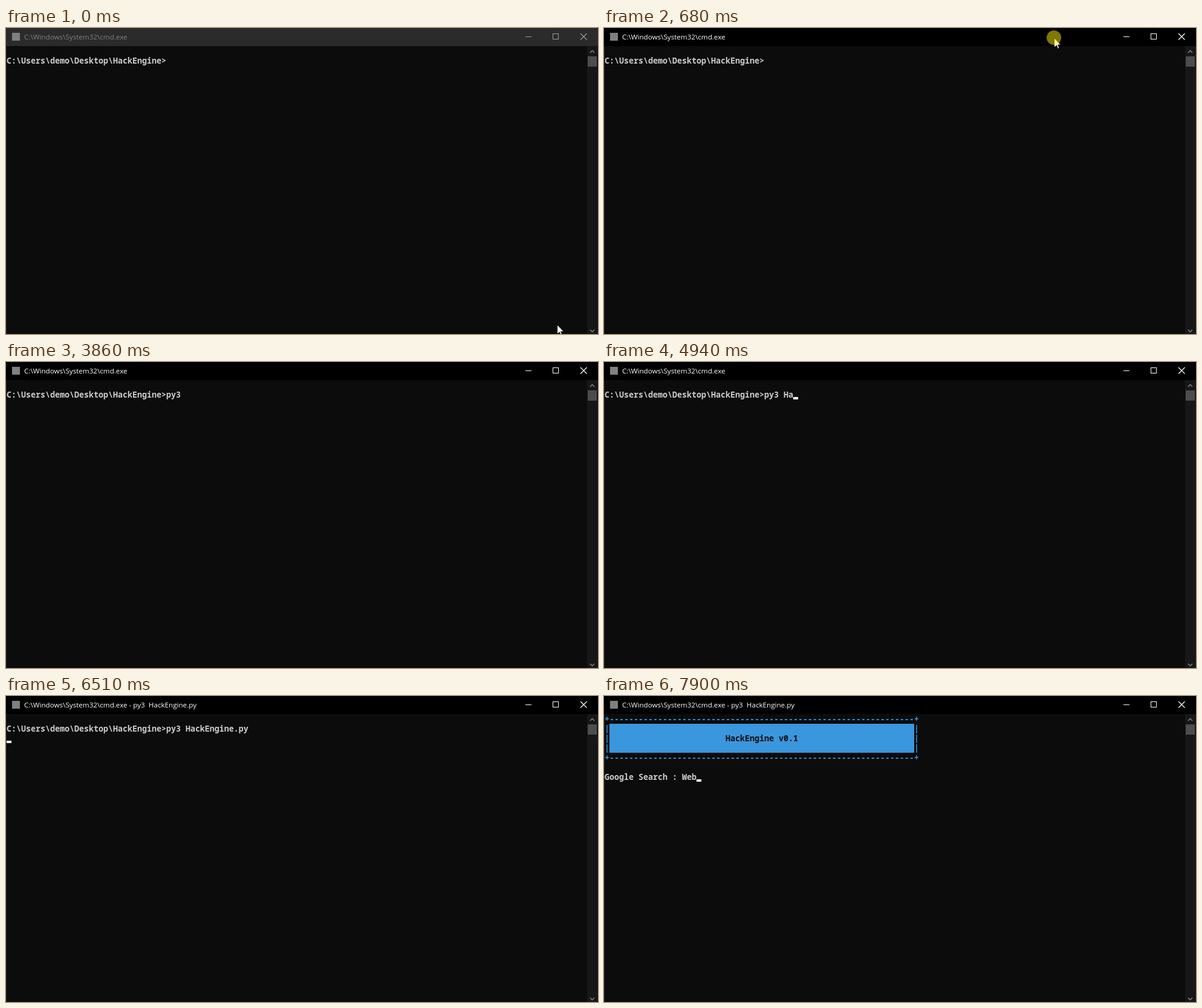
Write an HTML page that moves like this. It is 979x507 px and loops after 8000 ms.

```html
<!DOCTYPE html>
<html lang="en">
<head>
<meta charset="utf-8">
<title>Console</title>
<style>
  html, body { margin: 0; width: 100%; height: 100%; overflow: hidden; background: #0c0c0c; }
  svg { display: block; width: 979px; height: 507px; }
  text { white-space: pre; }
  .mono { font: 600 13.333px "Noto Sans Mono", "DejaVu Sans Mono", monospace; fill: #ccc; }
  .mono.blue { fill: #3a96dd; }
  .mono.dark { fill: #0c0c0c; }
  #title { font: 11.65px "Open Sans", "Noto Sans", sans-serif; }
  .line { fill: none; stroke-width: 1; }
</style>
</head>
<body>
<svg viewBox="0 0 979 507">
  <rect width="979" height="507" fill="#0c0c0c"/>
  <path d="M.5 30V507" class="line" stroke="#222"/>
  <rect id="bar" width="979" height="30"/>
  <rect x="10" y="8" width="13" height="13" fill="#808080"/>
  <text id="title" x="30" y="19"></text>
  <g id="buttons" class="line">
    <path d="M859 14.5h10M904.5 9.5h9v9h-9z" shape-rendering="crispEdges"/>
    <path d="M950 9l10.5 10.5M960.5 9l-10.5 10.5" stroke-width="1.2"/>
  </g>

  <rect x="961" y="30" width="18" height="477" fill="#171717"/>
  <rect x="962" y="47" width="15" height="17" fill="#4d4d4d"/>
  <path d="M966 41l3.5-3.5 3.5 3.5M966 500l3.5 3.5 3.5-3.5" fill="none" stroke="#7c7c7c" stroke-width="1.7"/>

  <text id="prompt" class="mono"></text>
  <g id="banner">
    <rect x="9" y="46" width="504" height="48" fill="#3a96dd"/>
  </g>
  <rect id="caret" width="8" height="4" fill="#fff"/>

  <path id="mouse" d="M.5 .5V16.5L4.3 12.9 6.7 18.4 9 17.4 6.7 12H11.5z" fill="#fff" stroke="#000"/>
  <circle id="click" cx="744" cy="16" r="12" fill="#fff000" fill-opacity=".5"/>
</svg>
<script>
const LOOP = 8000;
const CELL = 8, ROW = 16, TOP = 30;
const PATH = "C:\\Windows\\System32\\cmd.exe";
const PROMPT = "C:\\Users\\demo\\Desktop\\HackEngine>";
const ASK = "Google Search : ";
const FOCUS = 680, RUN = 6510, READY = 6740;

// time, typed text, caret visible
const steps = [
  [0, "", 0], [1220, "", 1], [1760, "", 0],
  [2220, "p", 0], [2300, "py", 1], [2680, "py3", 1], [2760, "py3 ", 0],
  [3310, "py3 ", 1], [3860, "py3 ", 0], [4390, "py3 ", 1],
  [4790, "py3 H", 1], [4860, "py3 Ha", 0], [4940, "py3 Ha", 1],
  [5110, "py3 Hac", 1], [5180, "py3 Hack", 1], [5410, "py3 Hack", 0],
  [5960, "py3 Hack", 1], [6040, "py3 HackE", 1], [6360, "py3 HackEngine.py", 1],
  [RUN, "py3 HackEngine.py", 1], [READY, "", 1],
  [7520, "W", 1], [7590, "We", 0], [7670, "We", 1], [7900, "Web", 1]
];
const moves = [0, 70, 140, 220, 300, 380, 460, 530, 610];

const $ = id => document.getElementById(id);
const [bar, title, buttons, prompt, banner, caret, mouse, click] =
  ["bar", "title", "buttons", "prompt", "banner", "caret", "mouse", "click"].map($);

const colX = col => 1 + col * CELL;
const baseline = row => TOP + row * ROW + 13;
const show = (el, on) => el.setAttribute("visibility", on ? "visible" : "hidden");

function place(el, col, row) {
  el.setAttribute("x", colX(col));
  el.setAttribute("y", baseline(row));
}

function addText(str, col, row, tone) {
  const el = document.createElementNS("http://www.w3.org/2000/svg", "text");
  el.setAttribute("class", "mono " + tone);
  el.textContent = str;
  place(el, col, row);
  banner.append(el);
}

const rule = "+" + "-".repeat(63) + "+";
addText(rule, 0, 0, "blue");
addText(rule, 0, 4, "blue");
for (const row of [1, 2, 3]) {
  addText("|", 0, row, "blue");
  addText("|", 64, row, "blue");
}
addText("HackEngine v0.1", 25, 2, "dark");

function drawWindow(t) {
  const active = t >= FOCUS;
  bar.setAttribute("fill", active ? "#000" : "#2b2b2b");
  title.setAttribute("fill", active ? "#fff" : "#808080");
  buttons.setAttribute("stroke", active ? "#fff" : "#999");
  title.textContent = t < RUN ? PATH : PATH + " - py3  HackEngine.py";
}

function drawConsole(t) {
  const [, typed, blink] = steps.findLast(s => s[0] <= t);
  const ready = t >= READY;
  const line = (ready ? ASK : PROMPT) + typed;
  const row = ready ? 6 : 1;
  prompt.textContent = line;
  place(prompt, 0, row);
  show(banner, ready);

  const waiting = t >= RUN && !ready;
  caret.setAttribute("x", colX(waiting ? 0 : line.length));
  caret.setAttribute("y", TOP + (waiting ? 2 : row) * ROW + 12);
  show(caret, blink);
}

function drawMouse(t) {
  const p = moves.findLast(m => m <= t) / 610;
  const k = p * p * (3 - 2 * p);
  const x = t < FOCUS ? 911 - 166 * k : 744;
  const y = t < FOCUS ? 491 - 474 * k : 16;
  mouse.setAttribute("transform", `translate(${Math.round(x)} ${Math.round(y)})`);
  show(mouse, t < 840);
  show(click, t >= FOCUS && t < 760);
}

function render() {
  const t = performance.now() % LOOP;
  drawWindow(t);
  drawConsole(t);
  drawMouse(t);
  requestAnimationFrame(render);
}
render();
</script>
</body>
</html>
```
